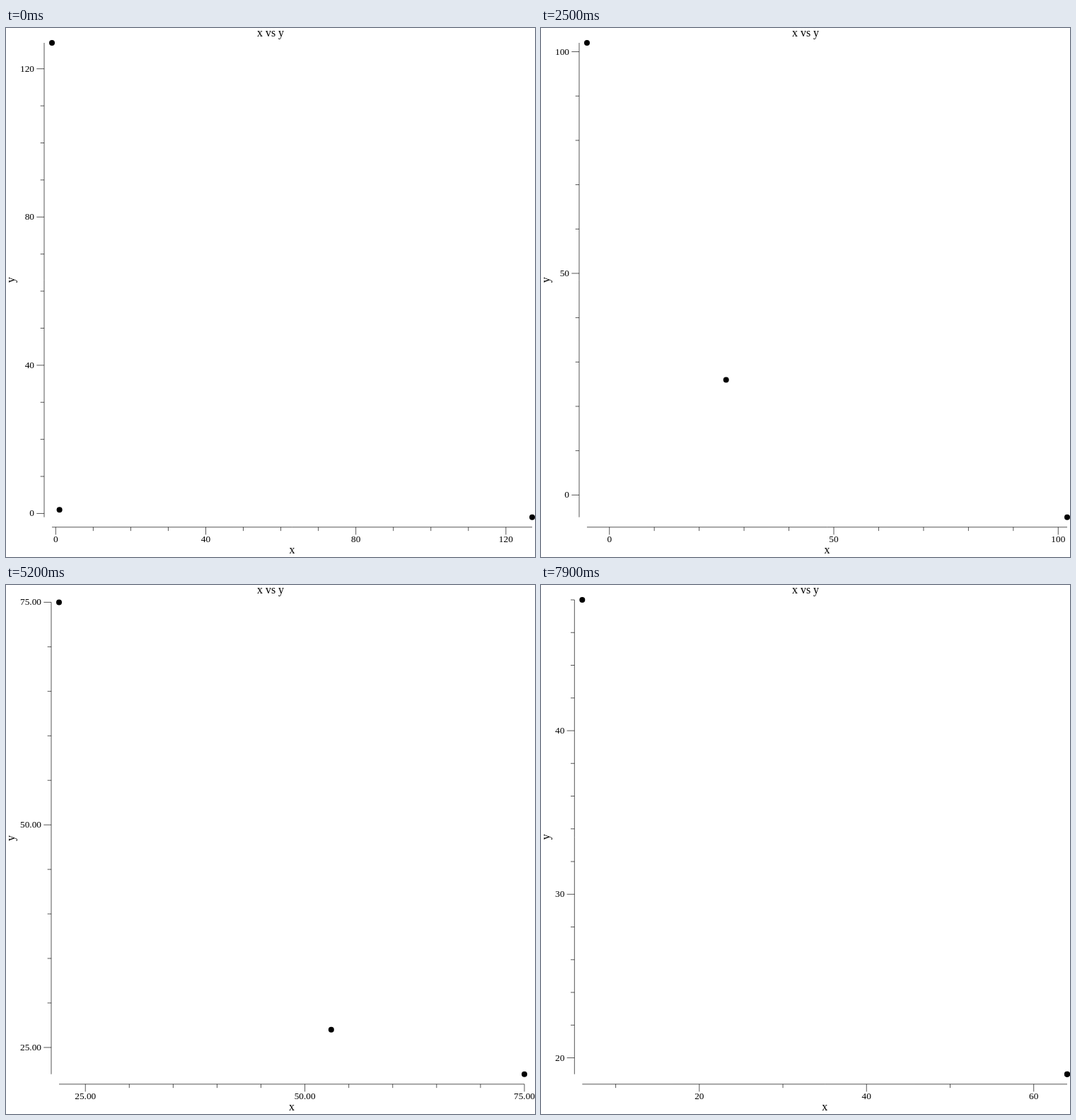
Animation, 748 px wide and 748 px high, one loop 8000 ms. Source, as an HTML page with a canvas:

```html
<!DOCTYPE html>
<html lang="en">
<head>
<meta charset="utf-8">
<title>x vs y</title>
<style>
  html, body { margin: 0; width: 100%; height: 100%; overflow: hidden; background: #fff; }
  canvas { display: block; }
</style>
</head>
<body>
<canvas id="plot" width="748" height="748"></canvas>
<script>
const SIZE = 748, STEP_MS = 100, STEPS = 80;
const RADIUS = 4, TICK = 32 / 3, LINE = 2 / 3;
const TOP = 17, BOTTOM = 691.7, AXIS_Y = 705.8;
const HALF_LABEL = 7.4;
const SERIF = '"Liberation Serif", "Times New Roman", serif';
const SMALL = `${40 / 3}px ${SERIF}`;
const LARGE = `16px ${SERIF}`;
const ctx = document.getElementById('plot').getContext('2d');

// Three points on diagonal paths; two of them meet and stay together.
function pointsAt(k) {
  const drift = k < 15 ? -1 - k : k < 58 ? k - 30 : 85 - k;
  const rise = k < 40 ? 1 + k : k < 64 ? 79 - k : Math.min(19, k - 47);
  return [
    [drift, 127 - k],
    [Math.min(64, 1 + k), rise],
    [Math.max(64, 127 - k), k < 58 ? drift : Math.max(19, drift)]
  ];
}

// Label placement: weigh simplicity, coverage and density of candidate steps.
const NICE = [1, 5, 2, 2.5, 4, 3];
const WANT = 3;
const score = (simple, cover, dense) => 0.25 * simple + 0.2 * cover + 0.5 * dense + 0.05;

function coverage(lo, hi, first, last) {
  const r = 0.1 * (hi - lo);
  return 1 - 0.5 * ((hi - last) ** 2 + (lo - first) ** 2) / (r * r);
}

function maxCoverage(range, span) {
  return span <= range ? 1 : 1 - (0.5 * (span - range) / (0.1 * range)) ** 2;
}

function density(have, lo, hi, first, last) {
  const d = (have - 1) / (last - first) * (hi - lo) / (WANT - 1);
  return 2 - Math.max(d, 1 / d);
}

function chooseLabels(lo, hi) {
  const range = hi - lo;
  let best = { score: -2 };
  for (let skip = 1; ; skip++) {
    for (let i = 0; i < NICE.length; i++) {
      const q = NICE[i];
      const base = 1 - i / (NICE.length - 1) - skip;
      if (score(base + 1, 1, 1) < best.score) return best;
      for (let have = 2; ; have++) {
        const dense = have < WANT ? 1 : 2 - (have - 1) / (WANT - 1);
        if (score(base + 1, 1, dense) < best.score) break;
        let mag = Math.ceil(Math.log10(range / (have + 1) / skip / q));
        for (; ; mag++) {
          const step = skip * q * 10 ** mag;
          const span = step * (have - 1);
          if (score(base + 1, maxCoverage(range, span), dense) < best.score) break;
          const end = Math.ceil(hi / step) * skip;
          for (let s = (Math.floor(hi / step) - have + 1) * skip; s <= end; s++) {
            const first = s * step / skip, last = first + span;
            if (first < lo || last > hi) continue;
            const m = first % step;
            const zero = (m < 1e-12 || step - m < 1e-12) && first <= 0 && last >= 0;
            const total = score(base + (zero ? 1 : 0), coverage(lo, hi, first, last),
              density(have, lo, hi, first, last));
            if (total > best.score) {
              best = { score: total, have, first, step, unit: skip * q, q, mag };
            }
          }
        }
      }
    }
  }
}

function makeAxis(values) {
  const lo = Math.min(...values), hi = Math.max(...values);
  const { have, first, step, unit, q, mag } = chooseLabels(lo, hi);
  const digits = Math.max(q % 1 ? 2 : 0, -mag);
  const major = Array.from({ length: have }, (_, i) => {
    const value = first + i * step;
    return { value, label: value.toFixed(digits) };
  });
  const divisions = unit === 1 || unit === 2.5 ? 5 : [2, 3, 4, 5].includes(unit) ? unit : 2;
  const gap = step / divisions;
  const minor = [];
  for (let i = Math.ceil((lo - first) / gap - 1e-9); first + i * gap <= hi + 1e-9; i++) {
    const value = first + i * gap;
    if (!major.some(t => Math.abs(t.value - value) < gap / 2)) minor.push({ value });
  }
  return { lo, hi, major, minor, norm: v => (v - lo) / (hi - lo) };
}

function line(x1, y1, x2, y2) {
  ctx.beginPath();
  ctx.moveTo(x1, y1);
  ctx.lineTo(x2, y2);
  ctx.stroke();
}

function text(str, x, y, font, align) {
  ctx.font = font;
  ctx.textAlign = align;
  ctx.fillText(str, x, y);
}

function draw(k) {
  const points = pointsAt(k);
  const xAxis = makeAxis(points.map(p => p[0]));
  const yAxis = makeAxis(points.map(p => p[1]));

  ctx.font = SMALL;
  const width = s => ctx.measureText(s).width;
  const axisX = 34 + Math.max(...yAxis.major.map(t => width(t.label)));
  const edge = axisX + 7, left = edge + RADIUS;

  // Shrink the data area when an end label would overflow it.
  const lastX = xAxis.major.at(-1), fx = xAxis.norm(lastX.value);
  const halfX = width(lastX.label) / 2;
  let right = SIZE - RADIUS;
  if (edge + fx * (SIZE - edge) + halfX > SIZE + RADIUS) {
    right = left + (SIZE - halfX - left) / fx;
  }
  const fy = yAxis.norm(yAxis.major.at(-1).value);
  let top = TOP + RADIUS;
  if ((1 - fy) * (BOTTOM + RADIUS - TOP) - HALF_LABEL < -RADIUS) {
    top = BOTTOM - (BOTTOM - TOP - HALF_LABEL) / fy;
  }
  const px = v => left + xAxis.norm(v) * (right - left);
  const py = v => BOTTOM - yAxis.norm(v) * (BOTTOM - top);

  ctx.fillStyle = '#fff';
  ctx.fillRect(0, 0, SIZE, SIZE);
  ctx.fillStyle = ctx.strokeStyle = '#000';
  ctx.lineWidth = LINE;

  text('x vs y', SIZE / 2, 12, LARGE, 'center');
  text('x', (left + right) / 2, 743, LARGE, 'center');
  ctx.save();
  ctx.translate(12.4, (top + BOTTOM) / 2);
  ctx.rotate(-Math.PI / 2);
  text('y', 0, 0, LARGE, 'center');
  ctx.restore();

  line(left, AXIS_Y, right, AXIS_Y);
  line(axisX, top, axisX, BOTTOM);
  for (const t of xAxis.major) {
    const x = px(t.value);
    line(x, AXIS_Y, x, AXIS_Y + TICK);
    text(t.label, x, 727, SMALL, 'center');
  }
  for (const t of yAxis.major) {
    const y = py(t.value);
    line(axisX - TICK, y, axisX, y);
    text(t.label, axisX - 14, y + 4, SMALL, 'right');
  }
  for (const t of xAxis.minor) line(px(t.value), AXIS_Y, px(t.value), AXIS_Y + TICK / 2);
  for (const t of yAxis.minor) line(axisX - TICK / 2, py(t.value), axisX, py(t.value));

  for (const [x, y] of points) {
    ctx.beginPath();
    ctx.arc(px(x), py(y), RADIUS, 0, 2 * Math.PI);
    ctx.fill();
  }
}

const start = performance.now();
let shown = -1;
function tick() {
  const k = Math.floor((performance.now() - start) / STEP_MS) % STEPS;
  if (k !== shown) draw(shown = k);
  requestAnimationFrame(tick);
}
tick();
</script>
</body>
</html>
```
